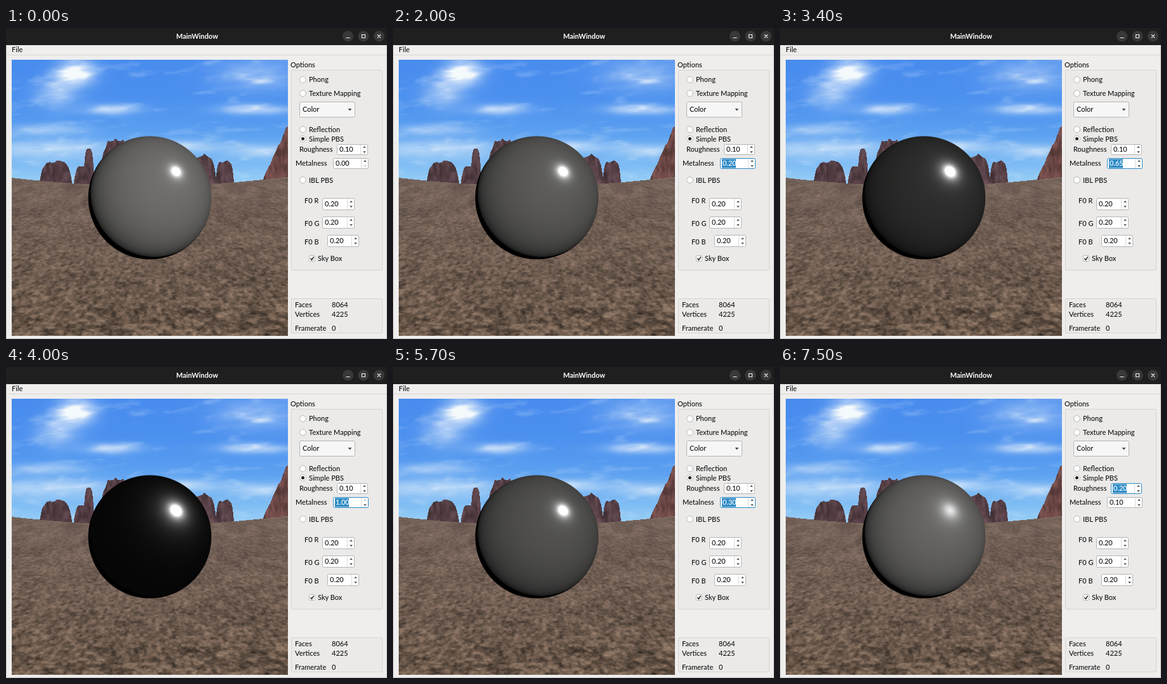
Write an HTML page with a canvas that moves like this. It is 600 by 490 pixels and loops after 8000 ms.

```html
<!DOCTYPE html>
<html lang="en">
<head>
<meta charset="utf-8">
<title>MainWindow</title>
<style>
  html, body { margin: 0; width: 100%; height: 100%; overflow: hidden; background: #efeeed; }
  canvas, svg { position: absolute; display: block; }
  svg { left: 0; top: 0; }
  #scene { left: 9px; top: 50px; }
  #ball { left: 127px; top: 168px; }
  text { font: 500 11px Lato, "Open Sans", sans-serif; fill: #141414; white-space: pre; }
  .title { font-weight: 700; fill: #fff; text-anchor: middle; }
  .panel { fill: #ebeae9; stroke: #d6d4d2; }
  .field { fill: #fff; stroke: #b8b5b2; }
  .pick { fill: none; }
  .arrow { fill: #4a4a4a; }
  .off { fill: #c4c2c0; }
  .focus .field { stroke: #308cc6; }
  .focus .pick { fill: #308cc6; }
  .focus text { fill: #fff; }
</style>
</head>
<body>
<svg id="ui" width="600" height="490">
  <rect width="600" height="490" fill="#efeeed"/>
  <rect width="600" height="27" fill="#201f1f"/>
  <path d="M.5 27V489.5H599.5V27" fill="none" stroke="#c4c2c0"/>
  <text class="title" x="301" y="17">MainWindow</text>
  <g fill="#3a3939"><circle cx="538.5" cy="13" r="8.5"/><circle cx="563" cy="13" r="8.5"/><circle cx="587.5" cy="13" r="8.5"/></g>
  <path d="M535.5 15.5h6M560.5 10.5h5v5h-5zM585 10.5l5 5m0-5l-5 5" fill="none" stroke="#f4f4f4" stroke-width="1.1"/>
  <text x="9" y="38">File</text>
  <path d="M1 42.5H599" stroke="#d9d7d5"/>

  <text x="448" y="62">Options</text>
  <rect class="panel" x="449.5" y="66.5" width="143" height="315" rx="1.5"/>
  <g class="field">
    <circle cx="467.5" cy="81.5" r="4.9"/><circle cx="467.5" cy="103" r="4.9"/>
    <circle cx="467.5" cy="160" r="4.9"/><circle cx="467.5" cy="174.5" r="4.9"/>
    <circle cx="467.5" cy="239.5" r="4.9"/>
  </g>
  <circle cx="467.5" cy="174.5" r="2.5" fill="#222"/>
  <text x="477" y="85">Phong</text>
  <text x="477" y="107">Texture Mapping</text>
  <rect class="field" x="462.5" y="116.5" width="87" height="24" rx="2" style="fill:#f7f6f6"/>
  <path class="arrow" d="M538.5 127h6l-3 3.4z"/>
  <text x="467" y="132">Color</text>
  <text x="477" y="164">Reflection</text>
  <text x="477" y="178.5">Simple PBS</text>
  <text x="462" y="195">Roughness</text>
  <text x="456" y="217">Metalness</text>
  <text x="477" y="244">IBL PBS</text>
  <text x="470" y="276">F0 R</text>
  <text x="470" y="312">F0 G</text>
  <text x="470" y="341">F0 B</text>
  <rect class="field" x="477.5" y="358.5" width="9" height="9" rx="1"/>
  <path d="M479.5 363l2 2.4 3.2-5" fill="none" stroke="#222" stroke-width="1.5"/>
  <text x="491" y="367">Sky Box</text>

  <rect class="panel" x="449.5" y="426.5" width="143" height="54" rx="1.5"/>
  <text x="455" y="440">Faces</text><text x="513" y="440">8064</text>
  <text x="455" y="455">Vertices</text><text x="513" y="455">4225</text>
  <text x="455" y="476.5">Framerate</text><text x="513" y="476.5">0</text>
</svg>
<canvas id="scene" width="435" height="435"></canvas>
<canvas id="ball" width="200" height="200"></canvas>
<script>
const ui = document.getElementById('ui');
const clamp = (v, a = 0, b = 1) => Math.min(b, Math.max(a, v));
const mix = (a, b, k) => a + (b - a) * k;
const mixRgb = (a, b, k) => a.map((v, i) => mix(v, b[i], k));
const shade = (rgb, f) => rgb.map(v => v * f);

// ---------- spin boxes ----------
function spin(x, y, w, h, value) {
  const r = x + w, m = y + h / 2, ax = r - 5.5;
  ui.insertAdjacentHTML('beforeend', `<g>
    <rect class="field" x="${x + .5}" y="${y + .5}" width="${w - 1}" height="${h - 1}" rx="2"/>
    <path d="M${r - 11.5} ${y + 1}v${h - 2}" stroke="#dcdad8"/>
    <rect class="pick" x="${x + 3}" y="${m - 7}" width="22" height="14"/>
    <path class="arrow" d="M${ax - 2.3} ${m - 2.8}h4.6l-2.3-2.8z"/>
    <path class="arrow" d="M${ax - 2.3} ${m + 2.8}h4.6l-2.3 2.8z"/>
    <text x="${x + 4}" y="${m + 3.7}">${value}</text></g>`);
  const g = ui.lastElementChild, [up, down] = g.querySelectorAll('.arrow');
  return (v, focus) => {
    g.lastElementChild.textContent = v.toFixed(2);
    g.classList.toggle('focus', focus);
    up.classList.toggle('off', v >= 1);
    down.classList.toggle('off', v <= 0);
  };
}
const setRough = spin(521, 183, 49, 17, '0.10');
const setMetal = spin(515, 205, 56, 17, '0.00');
spin(498, 268, 51, 19, '0.20');
spin(498, 297, 51, 19, '0.20');
spin(506, 326, 50, 19, '0.20');

// ---------- noise ----------
function hash(x, y) {
  const s = Math.sin(x * 127.1 + y * 311.7) * 43758.5453;
  return s - Math.floor(s);
}
function noise(x, y) {
  const ix = Math.floor(x), iy = Math.floor(y);
  let u = x - ix, v = y - iy;
  u *= u * (3 - 2 * u);
  v *= v * (3 - 2 * v);
  return mix(mix(hash(ix, iy), hash(ix + 1, iy), u),
             mix(hash(ix, iy + 1), hash(ix + 1, iy + 1), u), v);
}
const fbm = (x, y) => noise(x, y) * .55 + noise(x * 2.1 + 7, y * 2.1) * .3 + noise(x * 4.3, y * 4.3 + 3) * .15;

// ---------- desert ----------
// cloud: x, y, half width, half height, strength
const clouds = [
  [111, 68, 28, 19, 1.3], [82, 103, 32, 22, .6], [395, 74, 62, 24, .5], [165, 128, 42, 8, .8],
  [388, 128, 52, 8, .8], [62, 160, 58, 8, .55], [70, 191, 95, 14, .7], [272, 186, 55, 9, .8], [400, 192, 60, 10, .55]
];
// rock: centre, half width, top, squareness
const rocks = [
  [78, 27, 210, 5], [122, 17, 217, 4], [130, 9, 192, 4], [173, 28, 177, 4],
  [312, 20, 200, 4], [344, 15, 210, 6], [460, 63, 110, .9]
];
const horizon = x => 248 - 13 * ((x - 220) / 215) ** 2;

function skyAt(x, y) {
  const k = clamp((y - 50) / 190), n = fbm(x / 40 + 3, (y + x * .06) / 12);
  let d = Math.max(0, n - .6) * .7 + .3 * k ** 4;
  for (const [cx, cy, w, h, s] of clouds)
    d += s * Math.exp(-(((x - cx) / w) ** 2) - ((y - cy) / h) ** 2) * (.4 + .9 * n);
  return mixRgb(mixRgb([72, 140, 238], [110, 186, 243], k * k), [244, 249, 252], clamp(d));
}
function rockAt(x, y) {
  const hit = rocks.some(([c, w, top, p]) => {
    const rise = 1 - (Math.abs(x - c) / w) ** p;
    return rise > 0 && y > 252 - (252 - top) * rise * (.95 + .1 * noise(x / 4, c));
  });
  const tone = mixRgb([86, 64, 70], [108, 72, 70], clamp((x - 350) / 60));
  return hit && shade(tone, .6 + .75 * fbm(x / 5, y / 13));
}
function groundAt(x, y) {
  const d = y - horizon(x), k = d / 240, s = 1.4 + d / 62;
  const u = (x - 226) / (1.5 * s), v = 62 * Math.log(s);
  const grain = noise(u, v) * .6 + noise(u * 2 + 9, v * 2) * .4 - .5;
  const patch = fbm(u / 6, v / 5) - .5;
  return shade(mixRgb([115, 97, 88], [105, 87, 73], k), 1 + grain * mix(.22, 1.1, k) + patch * .35);
}
function drawScene() {
  const size = 435, c = document.getElementById('scene').getContext('2d');
  const img = c.createImageData(size, size);
  for (let j = 0; j < size; j++) for (let i = 0; i < size; i++) {
    const x = i + 9, y = j + 50;
    const rgb = y > horizon(x) ? groundAt(x, y) : rockAt(x, y) || skyAt(x, y);
    img.data.set([...rgb, 255], (j * size + i) * 4);
  }
  c.putImageData(img, 0, 0);
}

// ---------- shaded sphere ----------
const ballCtx = document.getElementById('ball').getContext('2d');
function drawBall(metal, rough) {
  const size = 200, R = 97, img = ballCtx.createImageData(size, size);
  const a2 = (rough * .85) ** 2, peak = (.055 + .055 * metal) / (3.1 * a2);
  const base = .16 * (1 - metal) ** 1.9;
  for (let y = 0; y < size; y++) for (let x = 0; x < size; x++) {
    const dx = x - 99, dy = y - 99, alpha = clamp(R - Math.hypot(dx, dy) + .5);
    if (!alpha) continue;
    const nx = dx / R, ny = -dy / R, nz = Math.sqrt(Math.max(0, 1 - nx * nx - ny * ny));
    const light = Math.max(0, .27 * (nx + ny) + .924 * nz);
    const half = .428 * (nx + ny) + .796 * nz, s2 = half > 0 ? 1 - half * half : 1;
    const spec = light > 0 ? peak * (a2 / (a2 + s2 * (1 - a2))) ** 2 : 0;
    const rgb = [1, .98, .95].map(t => 255 * clamp(base * t * light ** .8 + spec) ** (1 / 2.2));
    img.data.set([...rgb, 255 * alpha], (y * size + x) * 4);
  }
  ballCtx.putImageData(img, 0, 0);
}

// ---------- timeline ----------
// held-button ramps: start ms, end ms, change in hundredths
const metalRamps = [
  [1100, 1200, 5], [1400, 1600, 10], [1900, 2100, 10], [2300, 3000, 35], [3300, 4000, 40],
  [4500, 5100, -50], [5300, 5700, -20], [5800, 6000, -10], [6100, 6400, -10]
];
const roughRamps = [[7300, 7500, 10]];

// value at t, moving every 100 ms in steps of 0.05
function valueAt(ramps, from, t) {
  const tick = Math.floor(t / 100) * 100;
  const sum = ramps.reduce((v, [a, b, change]) => v + change * clamp((tick - a) / (b - a)), from);
  return Math.round(sum / 5) * 5 / 100;
}

let shown = '';
function frame(now) {
  const t = now % 8000;
  const metal = valueAt(metalRamps, 0, t), rough = valueAt(roughRamps, 10, t);
  const key = metal + '/' + rough;
  if (key !== shown) {
    shown = key;
    setMetal(metal, t >= 1200 && t < 7400);
    setRough(rough, t >= 7400);
    drawBall(metal, rough);
  }
  requestAnimationFrame(frame);
}
drawScene();
requestAnimationFrame(first => {
  const loop = now => frame(now);
  loop(first);
});
</script>
</body>
</html>
```
